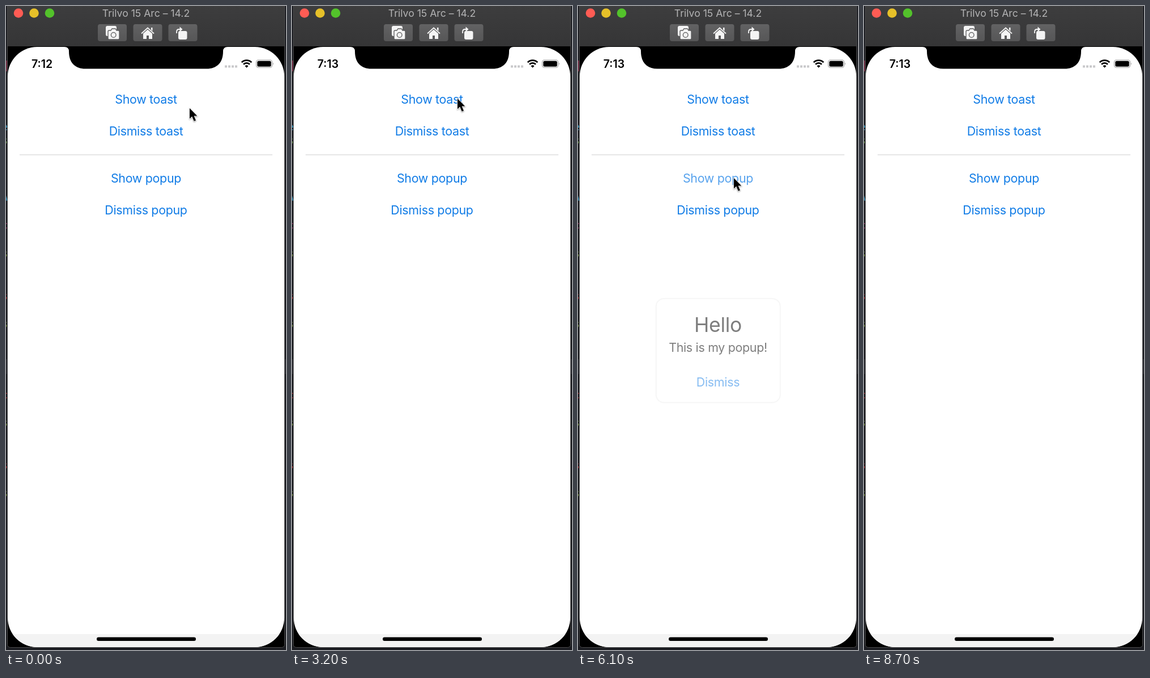
An HTML page for the animation above (8.9 s loop, 494x1134 px).

```html
<!DOCTYPE html>
<html lang="en">
<head>
<meta charset="utf-8">
<style>
html, body { margin: 0; width: 100%; height: 100%; overflow: hidden; background: #000; }
svg { display: block; font-family: Inter, "Liberation Sans", sans-serif; }
.label { font-size: 21.4px; letter-spacing: -.014em; text-anchor: middle; }
.link { fill: #117ce6; }
.card rect { fill: #fff; filter: drop-shadow(0 0 1.3px #d4d4d4) drop-shadow(0 0 1px #e2e2e2); }
.code { font: 17px "DejaVu Sans Mono", monospace; text-anchor: end; }
</style>
</head>
<body>
<svg width="494" height="1134" viewBox="0 0 494 1134">
  <defs>
    <linearGradient id="bar" x2="0" y2="1">
      <stop stop-color="#3d3d3e"/><stop offset="1" stop-color="#353536"/>
    </linearGradient>
    <linearGradient id="key" x2="0" y2="1">
      <stop stop-color="#626263"/><stop offset="1" stop-color="#565657"/>
    </linearGradient>
    <clipPath id="screen"><rect x="3" y="72" width="488" height="1057" rx="52"/></clipPath>
  </defs>

  <!-- editor behind the window -->
  <rect width="494" height="1134" fill="#1b1c21"/>
  <path d="M0 622h3v26h-3zM491 622h3v26h-3z" fill="#2c2d33"/>
  <path d="M0 96h3v19h-3z" fill="#6b2a40"/>
  <g id="code" class="code"></g>

  <!-- window -->
  <rect x="2.5" y="-9" width="489" height="1138.5" rx="5" stroke="#4b4b4c"/>
  <rect x="3" width="488" height="71" fill="url(#bar)"/>
  <circle cx="22" cy="12.5" r="8.3" fill="#ff5c54"/>
  <circle cx="49.500" cy="12.500" r="8.3" fill="#e6c029"/>
  <circle cx="77" cy="12.500" r="8.3" fill="#53c22b"/>
  <text x="247" y="19" text-anchor="middle" font-size="17.6" fill="#b4b4b5">Trilvo 15 Arc – 14.2</text>
  <g fill="url(#key)">
    <rect x="162" y="32" width="51" height="30" rx="4"/>
    <rect x="224.500" y="32" width="51" height="30" rx="4"/>
    <rect x="286.500" y="32" width="51" height="30" rx="4"/>
  </g>
  <g fill="#f4f4f4">
    <rect x="176" y="35" width="19" height="18" rx="3"/>
    <path d="M182 43h3l2-3h6l2 3h3q2 0 2 2v12q0 2-2 2h-16q-2 0-2-2v-12q0-2 2-2z" stroke="#5b5b5c" stroke-width="1.300"/>
    <circle cx="189.700" cy="51" r="4.300" fill="none" stroke="#5b5b5c" stroke-width="1.300"/>
    <path d="M239 48.500l11-10 11 10" fill="none" stroke="#f4f4f4" stroke-width="1.800"/>
    <path d="M256 38h2.500v6l-2.500-2zM242 48.500l8-7 8 7v9.500h-6v-6h-4v6h-6z"/>
    <rect x="304" y="44" width="15.500" height="15" rx="3"/>
    <path d="M301 48v-2.500q0-4.500 4.500-4.500h2" fill="none" stroke="#f4f4f4" stroke-width="1.800"/>
    <path d="M306.500 36.500l5 4.500-5 4.500z"/>
  </g>

  <!-- phone screen -->
  <g clip-path="url(#screen)">
    <path d="M3 72h488v1057h-488z" fill="#fff"/>
    <path d="M3 1106h488v23h-488z" fill="#f3f3f3"/>
    <path d="M103 71v1q8 0 8 8c0 20 11 30.500 29 30.500h214c18 0 29-10.500 29-30.500q0-8 8-8v-1z"/>
  </g>
  <rect x="160" y="1111.500" width="175" height="6.500" rx="3.250"/>
  <text id="clock" x="63.500" y="108.500" text-anchor="middle" font-size="19.500" font-weight="600"></text>
  <path d="M386 106.500h22" stroke="#c9c9cb" stroke-width="4" stroke-dasharray="4 2"/>
  <g fill="none" stroke="#000" stroke-width="2.800">
    <path d="M415.800 99.200a12.400 12.400 0 0 1 17.400 0M419 102.700a7.800 7.800 0 0 1 11 0"/>
    <path d="M424.500 108.800l-3-3.100a4.300 4.300 0 0 1 6 0z" fill="#000" stroke="none"/>
  </g>
  <rect x="441.500" y="95" width="28" height="13.500" rx="4" fill="none" stroke="#a2a2a2" stroke-width="1.200"/>
  <rect x="443.300" y="96.800" width="24.400" height="9.900" rx="2.500"/>
  <path d="M471 99.500q2 2.200 0 4.500z" fill="#a2a2a2"/>

  <path d="M24 262h446" stroke="#e6e6e7" stroke-width="1.800"/>
  <g class="label link">
    <text id="showToast" x="247" y="172.300">Show toast</text>
    <text id="dismissToast" x="247" y="228.300">Dismiss toast</text>
    <text id="showPopup" x="247" y="310.800">Show popup</text>
    <text x="247" y="366.800">Dismiss popup</text>
  </g>

  <g id="toast" class="card label">
    <rect x="178.500" y="546" width="137" height="121.500" rx="13"/>
    <circle cx="247" cy="585.500" r="12.200" fill="none" stroke="#000" stroke-width="2"/>
    <path d="M241.800 586.500l3.800 4.800 6.600-11" fill="none" stroke="#000" stroke-width="2" stroke-linecap="round" stroke-linejoin="round"/>
    <text x="247" y="633.500">Success</text>
  </g>
  <g id="popup" class="card label">
    <rect x="138.500" y="516" width="217.500" height="181.500" rx="13"/>
    <text x="247" y="574" font-size="35.500" style="font-size:35.5px">Hello</text>
    <text x="247" y="608.500">This is my popup!</text>
    <text id="dismiss" class="link" x="247" y="669.500">Dismiss</text>
  </g>

  <path id="cursor" d="M0 0v18.500l4.200-3.900 3.500 8.200 3.300-1.400-3.400-8h5.700z" stroke="#fff" stroke-width="1.500"
    paint-order="stroke" style="filter:drop-shadow(0 1px 1px #0006)"/>
</svg>
<script>
const LOOP = 8900, STEP = 100;
const $ = id => document.getElementById(id);
const clamp = v => Math.min(1, Math.max(0, v));
const ramp = (t, from, to) => clamp((t - from) / (to - from));
const smooth = k => k * k * (3 - 2 * k);

// [time, x, y] of the pointer tip
const path = [
  [100, 324, 180], [700, 268, 164], [1100, 267, 163], [1500, 399, 200], [1900, 399, 210],
  [2300, 296, 223], [2600, 296, 223], [2800, 371, 195], [3100, 292, 163], [3500, 292, 163],
  [4000, 413, 282], [4900, 413, 282], [5200, 403, 283], [5400, 403, 283], [5800, 275, 303],
  [6100, 275, 303], [6700, 433, 490], [6900, 433, 490], [7100, 394, 560], [7500, 268, 655],
  [8200, 266, 655], [8600, -20, 690]
];

// Fully visible between the two fades
const shown = (t, start, end, fade = 200) =>
  smooth(ramp(t, start, start + fade)) * (1 - smooth(ramp(t, end, end + fade)));

// Dimmed on press, then recovering
const pressed = (t, ...times) =>
  Math.min(...times.map(p => t < p ? 1 : .3 + .7 * ramp(t, p, p + 350)));

const codeMarks = [
  [219, "e", "#3a9bc4"], [243, "s", "#6f9a52"], [343, "A", "#3a9bc4"], [367, ":", "#ddd"],
  [392, "c", "#a83c72"], [442, "s", "#7c9a45"], [517, "s", "#b8383e"], [566, "s", "#7c9a45"],
  [691, "c", "#b8383e"], [740, "s", "#7c9a45"], [815, "s", "#b8383e"], [864, "s", "#7c9a45"]
];
$("code").innerHTML = codeMarks
  .map(([y, mark, color]) => `<text x="3" y="${y}" fill="${color}">${mark}</text>`).join("");

function pointer(t) {
  const next = path.findIndex(p => p[0] > t);
  if (next === 0) return path[0].slice(1);
  if (next < 0) return path[path.length - 1].slice(1);
  const [t0, x0, y0] = path[next - 1], [t1, x1, y1] = path[next];
  const k = smooth(ramp(t, t0, t1));
  return [x0 + (x1 - x0) * k, y0 + (y1 - y0) * k];
}

function draw(now) {
  const t = Math.floor(now % LOOP / STEP) * STEP;
  const fade = (id, value) => $(id).setAttribute("opacity", value);
  $("clock").textContent = t < 500 ? "7:12" : "7:13";
  fade("showToast", pressed(t, 800, 3300));
  fade("dismissToast", pressed(t, 2500));
  fade("showPopup", pressed(t, 5900));
  fade("dismiss", pressed(t, 7900));
  fade("toast", Math.max(shown(t, 800, 2500), shown(t, 3350, 4900, 300)));
  fade("popup", shown(t, 5950, 8000, 300));
  $("cursor").setAttribute("transform", `translate(${pointer(t)})`);
  requestAnimationFrame(draw);
}
requestAnimationFrame(draw);
</script>
</body>
</html>
```
